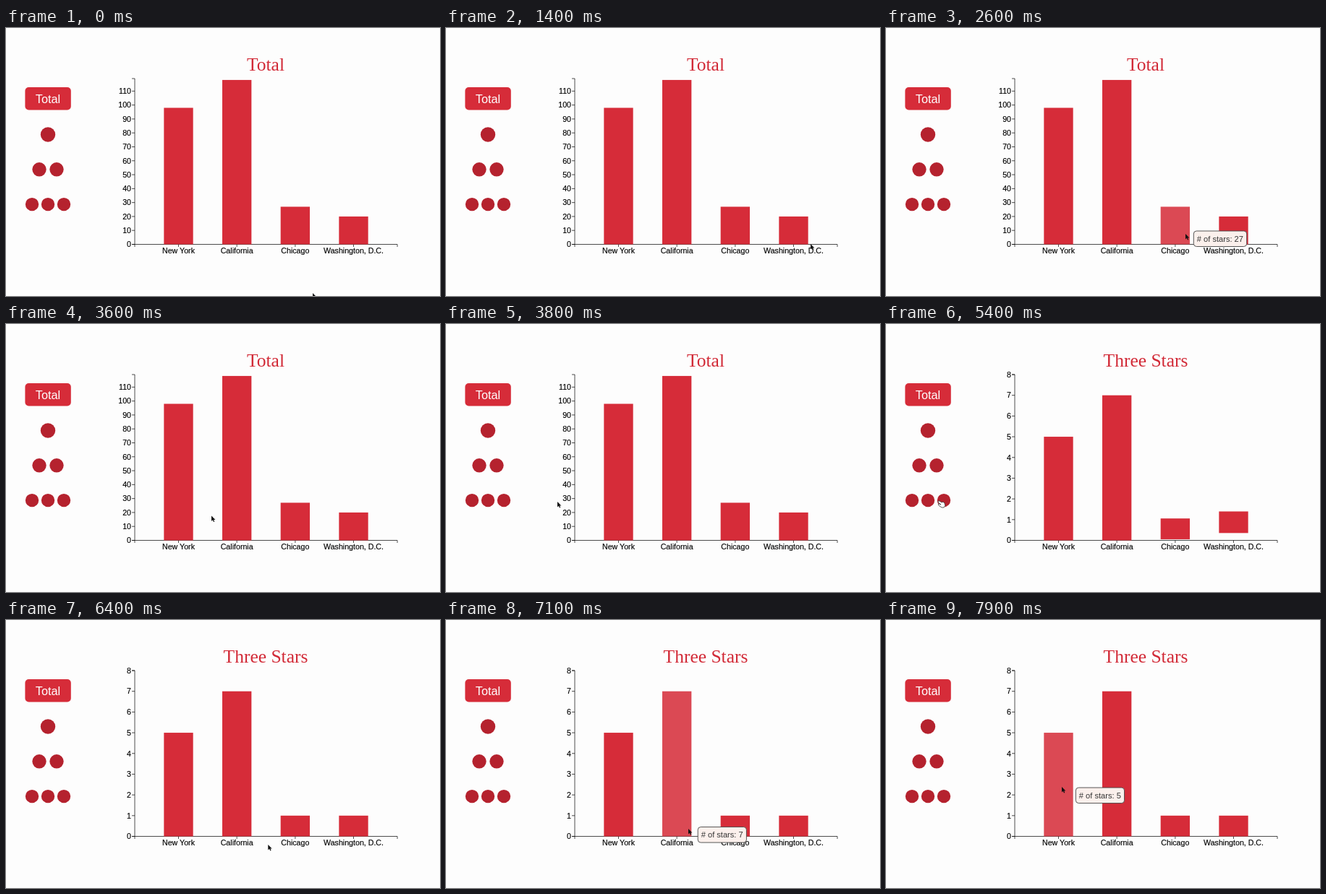
An HTML page for the animation above (8000 ms loop, 600x371 px).

```html
<!DOCTYPE html>
<html lang="en">
<head>
<meta charset="utf-8">
<title>Stars by region</title>
<style>
  html, body { margin: 0; width: 100%; height: 100%; overflow: hidden; background: #fdfdfd; }
  svg { display: block; width: 600px; height: 371px; font: 10.65px "Liberation Sans", Arial, sans-serif; }
  .title { font: 25.5px "Liberation Serif", Times, serif; fill: #d22a37; text-anchor: middle; }
  .button { font-size: 16.3px; fill: #fff; text-anchor: middle; }
  .label { stroke: #000; stroke-width: .15; text-anchor: middle; }
  .label.end { text-anchor: end; }
  .axis { fill: none; stroke: #000; stroke-width: .7; }
  .tip rect { fill: #fbf0ec; stroke: #444; stroke-width: .9; }
  .tip text { font-size: 11.1px; fill: #333; }
</style>
</head>
<body>
<svg id="stage" viewBox="0 0 600 371"></svg>
<script>
const stage = document.getElementById('stage');
const LOOP = 8000, STEP = 100, CLICK = 4900;
const RED = '#d62c39', LEFT = 178, RIGHT = 541, TOP = 70, BASE = 299.5;
const places = ['New York', 'California', 'Chicago', 'Washington, D.C.'];
const charts = {
  total: { title: 'Total', max: 119, tick: 10, values: [98, 118, 27, 20] },
  three: { title: 'Three Stars', max: 8, tick: 1, values: [5, 7, 1, 1] }
};

// Pointer moves between rests
const moves = [
  { from: 100, to: 200, x: 430, y: 390 },
  { from: 500, to: 600, x: 555, y: 311 },
  { from: 800, to: 1600, x: 487, y: 295 },
  { from: 1900, to: 2500, x: 414, y: 285 },
  { from: 3400, to: 3800, x: 154, y: 246 },
  { from: 3900, to: 4500, x: 73, y: 245 },
  { from: 5700, to: 6400, x: 362.3, y: 311 },
  { from: 6600, to: 7100, x: 335, y: 289 },
  { from: 7500, to: 7900, x: 243, y: 231 }
];

const mix = (a, b, k) => a + (b - a) * k;
const clamp = k => Math.max(0, Math.min(1, k));
const cubic = k => k < .5 ? 4 * k ** 3 : 1 - 4 * (1 - k) ** 3;

// Band scale with half a band of padding
const band = (RIGHT - LEFT) / (places.length + .5);
const barW = band / 2;
const barX = i => LEFT + barW + band * i;
const barH = (chart, i) => (BASE - TOP) * chart.values[i] / chart.max;

const text = (x, y, s, cls) => `<text x="${x}" y="${y}" class="${cls}">${s}</text>`;
const rect = (x, y, w, h, more) => `<rect x="${x}" y="${y}" width="${w}" height="${h}" ${more}/>`;

function pointerAt(t) {
  let x = 424, y = 367;
  for (const m of moves) {
    const k = clamp((t - m.from) / (m.to - m.from));
    x = mix(x, m.x, k);
    y = mix(y, m.y, k);
  }
  return [x, y];
}

function sidebar() {
  let out = rect(26.4, 82, 63.4, 31.5, `rx="5" fill="${RED}"`) + text(58, 103.7, 'Total', 'button');
  for (let n = 1; n <= 3; n++) {
    for (let i = 0; i < n; i++) {
      const x = 58 + (i - (n - 1) / 2) * (28 - 2 * n);
      out += `<circle cx="${x}" cy="${99.2 + 48.3 * n}" r="${10.7 - .5 * n}" fill="#b5222e"/>`;
    }
  }
  return out;
}

function axes(chart) {
  let lines = `M174 ${TOP}H${LEFT}V${BASE}H174M${LEFT} 303V${BASE}H${RIGHT}V303`, labels = '';
  for (let v = 0; v <= chart.max; v += chart.tick) {
    const y = mix(BASE, TOP, v / chart.max);
    lines += `M174 ${y}H${LEFT}`;
    labels += text(173, y + 3.8, v, 'label end');
  }
  places.forEach((name, i) => {
    const x = barX(i) + barW / 2;
    lines += `M${x} ${BASE}V303`;
    labels += text(x, 312, name, 'label');
  });
  return `<path class="axis" d="${lines}"/>` + labels;
}

// New bars drop in from above one after another, black until their turn.
function bar(chart, i, t, hover) {
  let h = barH(chart, i), y = BASE - h, fill = RED;
  if (chart === charts.three) {
    const start = CLICK - 50 + 55 * i;
    const k = cubic(clamp((t - start) / 500));
    y = mix(38, y, k);
    h = mix(53, h, k);
    if (t < start - 20) fill = '#000';
  }
  return rect(barX(i), y, barW, h, `fill="${fill}" opacity="${hover ? .86 : 1}"`);
}

// The tooltip trails slightly behind the pointer.
function tooltip(value, t) {
  const [x, y] = pointerAt(t - 35);
  const w = 61 + 6.2 * String(value).length;
  return `<g class="tip" transform="translate(${x + 11.3} ${y - 4})">` +
    rect(0, 0, w, 21.5, 'rx="4"') + text(4.5, 14.7, '# of stars: ' + value, '') + '</g>';
}

function cursor(x, y) {
  const hand = x < 90;
  const d = hand
    ? 'M-1 1Q-1-1 1 0L4 2Q6 0 8 3Q10 7 7 9Q4 10 1 7L-1 5Q-1 4 1 4L3 5L0 3Z'
    : 'M0 0V7.4L1.8 5.8L3 8.5L4.3 7.9L3.1 5.4H5.4Z';
  const look = hand ? 'fill="#fff" stroke="#333" stroke-width=".8"' : 'fill="#111"';
  return `<path transform="translate(${x} ${y})" d="${d}" ${look}/>`;
}

function draw(t) {
  const chart = t < CLICK ? charts.total : charts.three;
  const [x, y] = pointerAt(t);
  const over = places.findIndex((_, i) => x >= barX(i) && x <= barX(i) + barW &&
    y < BASE && y > BASE - barH(chart, i));
  stage.innerHTML = sidebar() + text(359, 59.2, chart.title, 'title') + axes(chart) +
    places.map((_, i) => bar(chart, i, t, i === over)).join('') +
    (over >= 0 ? tooltip(chart.values[over], t) : '') + cursor(x, y);
}

const begin = performance.now();
let shown = -1;
function tick(now) {
  const t = Math.floor(Math.max(0, now - begin) % LOOP / STEP) * STEP;
  if (t !== shown) draw(shown = t);
  requestAnimationFrame(tick);
}
tick(begin);
</script>
</body>
</html>
```
